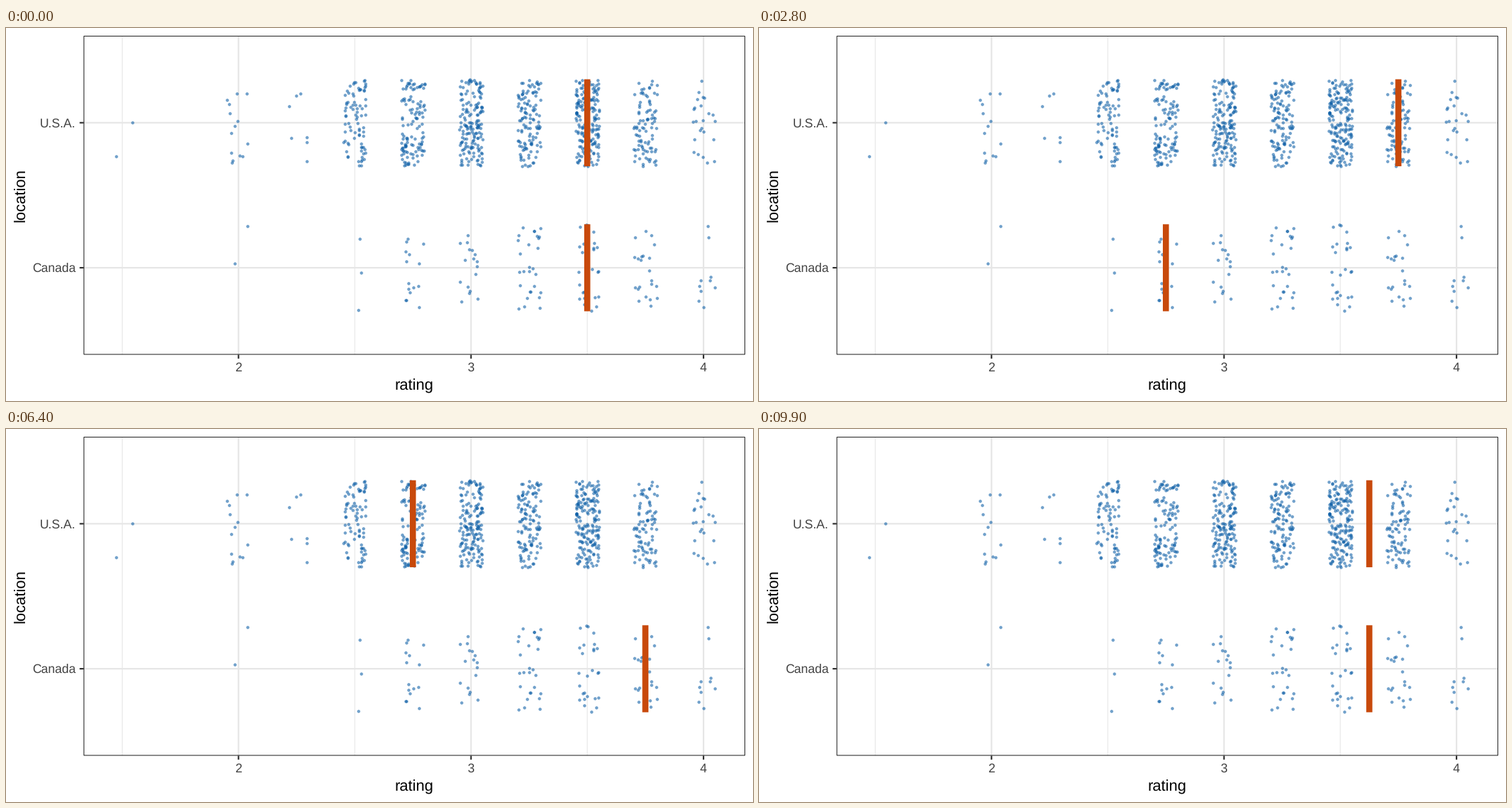
Recreate the animation shown at these times as a matplotlib script. Size 1058x529 px, loop 10000 ms.

```python
import numpy as np
import matplotlib.pyplot as plt
from matplotlib.animation import FuncAnimation
from matplotlib.patches import Rectangle

W, H, DPI = 1058, 529, 100
PX = 72 / DPI  # points per pixel
LEFT, RIGHT, TOP, BOTTOM = 109.8, 1047, 11, 463.4
UNIT_X = 329.3
UNIT_Y = (BOTTOM - TOP) / 2.2
USA, CANADA = TOP + 0.6 * UNIT_Y, TOP + 1.6 * UNIT_Y
ROW_HALF, COL_HALF = 0.3 * UNIT_Y, 0.05 * UNIT_X
BAR = 8.6
STEPS = 4  # three held frames and one halfway frame per draw

BLUE, ORANGE = "#0e60a8", "#c8490b"
GRID, DARK, TICK_TEXT = "#e6e6e6", "#2b2b2b", "#434343"

plt.rcParams["font.family"] = "Liberation Sans"
plt.rcParams["text.hinting"] = "none"

# Dots per quarter-point rating, from 1.5 up to 4.
COUNTS = {
    USA: [2, 0, 14, 7, 80, 116, 160, 120, 180, 90, 24],
    CANADA: [0, 0, 2, 0, 3, 15, 17, 28, 27, 22, 10],
}

# Rating marked in each row, draw by draw.
USA_DRAWS = [3.5, 3, 3.75, 3.5, 3.75, 3, 3.5, 3.75, 2.75, 3, 3.5, 4, 3,
             3, 2, 3, 2.75, 3.75, 3, 3.75, 3, 3.5, 3.75, 3, 3.75]
CANADA_DRAWS = [3.5, 3.5, 3.5, 3.25, 3.25, 3.5, 3.25, 2.75, 3.25, 3.5, 3.25,
                3, 3.25, 2.75, 3.5, 3.25, 3.75, 3.75, 3.5, 3.25, 3.75, 3.5,
                3.25, 3.5, 3.75]
DRAWS = np.column_stack([USA_DRAWS, CANADA_DRAWS])


def rating_x(rating):
    return 329.3 + (rating - 2) * UNIT_X


def jittered_dots():
    rng = np.random.default_rng(12)
    xs, ys = [], []
    for row, counts in COUNTS.items():
        centers = np.repeat(rating_x(1.5 + 0.25 * np.arange(len(counts))), counts)
        xs.append(centers + rng.uniform(-COL_HALF, COL_HALF, centers.size))
        ys.append(row + rng.uniform(-ROW_HALF, ROW_HALF, centers.size))
    return np.concatenate(xs), np.concatenate(ys)


fig = plt.figure(figsize=(W / DPI, H / DPI), dpi=DPI, facecolor="white")
ax = fig.add_axes([0, 0, 1, 1])
ax.set(xlim=(0, W), ylim=(H, 0))
ax.axis("off")


def line(x, y, width, color, z):
    ax.plot(x, y, color=color, lw=width * PX, zorder=z, snap=False,
            solid_capstyle="butt")


def label(x, y, text, size, color, **kw):
    ax.text(x, y, text, fontsize=size * PX, color=color, va="baseline",
            rotation_mode="anchor", **kw)


def draw_axes():
    for rating in (1.5, 2.5, 3.5):
        line([rating_x(rating)] * 2, [TOP, BOTTOM], 1.07, GRID, 1)
    for rating in (2, 3, 4):
        x = rating_x(rating)
        line([x, x], [TOP, BOTTOM], 2.13, GRID, 1)
        line([x, x], [BOTTOM, BOTTOM + 5.5], 2.13, DARK, 5)
        label(x, 487, str(rating), 17.6, TICK_TEXT, ha="center")
    for y, name in ((USA, "U.S.A."), (CANADA, "Canada")):
        line([LEFT, RIGHT], [y, y], 2.13, GRID, 1)
        line([LEFT - 5.5, LEFT], [y, y], 2.13, DARK, 5)
        label(99, y + 6.3, name, 17.6, TICK_TEXT, ha="right")
    label((LEFT + RIGHT) / 2, 513.5, "rating", 22, "black", ha="center")
    label(27, (TOP + BOTTOM) / 2, "location", 22, "black", ha="center",
          rotation=90)
    # Only the inner half of the border shows.
    inset = 1.07 / 2
    ax.add_patch(Rectangle((LEFT + inset, TOP + inset),
                           RIGHT - LEFT - 2 * inset, BOTTOM - TOP - 2 * inset,
                           fill=False, ec=DARK, lw=1.07 * PX, zorder=4,
                           snap=False))


draw_axes()
ax.scatter(*jittered_dots(), s=(3.4 * PX) ** 2, facecolor=BLUE,
           edgecolor=BLUE, linewidth=1.07 * PX, alpha=0.5, zorder=2)
bars = [ax.add_patch(Rectangle((0, row - ROW_HALF), BAR, 2 * ROW_HALF,
                               fc=ORANGE, lw=0, zorder=3, snap=False))
        for row in (USA, CANADA)]


def update(frame):
    draw, step = divmod(frame, STEPS)
    ratings = DRAWS[draw]
    if step == STEPS - 1:
        ratings = (ratings + DRAWS[(draw + 1) % len(DRAWS)]) / 2
    for bar, rating in zip(bars, ratings):
        bar.set_x(rating_x(rating) - BAR / 2)
    return bars


anim = FuncAnimation(fig, update, frames=len(DRAWS) * STEPS, interval=100,
                     repeat=True, repeat_delay=0)
plt.show()
```
